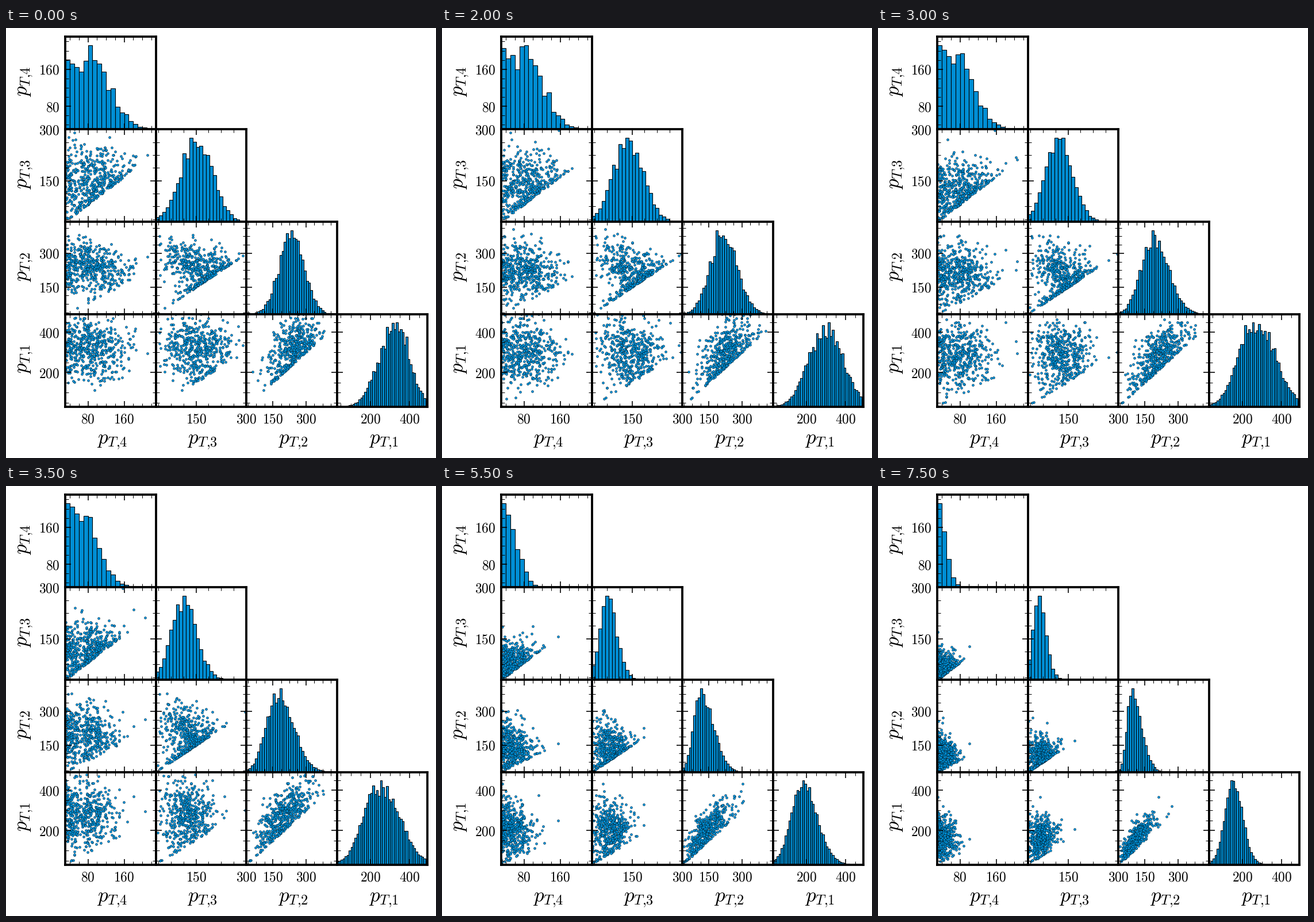
These frames come from a looping animation (748x748 px, 8 s). A matplotlib script:

```python
import numpy as np
import matplotlib.pyplot as plt
from matplotlib.animation import FuncAnimation
from matplotlib.ticker import AutoMinorLocator, MultipleLocator

SIZE, DPI = 748, 100
PX = 72 / DPI  # points per pixel
LEFT, TOP, W, H = 103.2, 15.4, 157.45, 160.8
FRAMES, STEP = 16, 500
N = 500
LOW, BIN = 30, 10
BLUE = "#008fd5"

rng = np.random.default_rng(14)
plt.rcParams["mathtext.fontset"] = "cm"


class Momentum:
    """One variable; (start, end) pairs give its peak and half-widths."""

    def __init__(self, n, high, major, peak, left, right, swell):
        self.name = r"$p_{T{,}%d}$" % n
        self.high, self.major = high, major
        self.peak, self.left, self.right = peak, left, right
        self.swell = swell  # extra width halfway through
        self.edges = np.arange(LOW, high + 1, BIN)
        self.mid = self.edges[:-1] + BIN / 2
        self.grain = rng.normal(0, 1, len(self.mid))

    def bars(self, s):
        ease = (1 + np.cos(np.pi * s)) / 2
        bump = self.swell * np.sin(np.pi * s) ** 2
        peak, left, right = (b + (a - b) * ease
                             for a, b in (self.peak, self.left, self.right))
        z = self.mid - peak
        z /= np.where(z < 0, left + bump / 2, right + bump)
        tail = 0.035 * s * np.exp(-np.abs(z) / 1.5) * (z > 0)
        jitter = self.grain + rng.normal(0, 0.4, len(z))
        h = (np.exp(-z * z / 2) + tail) * np.exp((0.04 + 0.06 * ease) * jitter)
        return h / h.max()


VARS = (
    Momentum(4, 230, 80, (72, 30), (65, 40), (48, 17), 6),
    Momentum(3, 300, 150, (152, 59), (47, 14), (46, 23), 4),
    Momentum(2, 440, 150, (235, 87), (57, 20), (56, 45), 20),
    Momentum(1, 490, 200, (320, 150), (78, 42), (75, 49), 38),
)


def sample(heights, s):
    """Ordered quadruples whose marginals follow the four histograms."""
    # p2 pulls p1 along and, early on, pushes p3 the other way
    pts = rng.normal(size=(N, 4))
    pts[:, 3] += (0.4 + 1.4 * s) * pts[:, 2]
    pts[:, 1] -= 0.8 * (1 - s) * pts[:, 2]
    ranked = []
    for var, h in zip(VARS, heights):
        cdf = np.append(0, np.cumsum(h)) / h.sum()
        ranked.append(np.sort(np.interp(rng.random(N), cdf, var.edges)))
    for _ in range(15):
        for v in range(4):
            pts[np.argsort(pts[:, v]), v] = ranked[v]
        pts.sort(axis=1)
    return pts


def weight(pts, heights):
    w = np.ones(N)
    for x, h in zip(pts.T, heights):
        i = np.clip((x - LOW) // BIN, 0, len(h) - 1).astype(int)
        w *= h[i] / h.sum() + 1e-9
    return w


def build():
    """Each step keeps the points that still fit and redraws the others."""
    states = []
    for s in np.arange(FRAMES) / (FRAMES - 1):
        heights = [var.bars(s) for var in VARS]
        pts = sample(heights, s)
        if states:
            old, last = states[-1]
            ratio = np.sqrt(weight(last, heights) / weight(last, old))
            stay = rng.random(N) < 0.75 * np.minimum(1, ratio)
            pts = np.where(stay[:, None], last, pts)
        states.append((heights, pts))
    return states


STATES = build()

fig = plt.figure(figsize=(SIZE / DPI, SIZE / DPI), dpi=DPI, facecolor="white")


def panel(row, col):
    x, y = LEFT + col * W, SIZE - TOP - (row + 1) * H
    ax = fig.add_axes([x / SIZE, y / SIZE, W / SIZE, H / SIZE])
    ax.set(xlim=(LOW, VARS[col].high), ylim=(LOW, VARS[row].high))
    ax.set_axisbelow(False)
    for axis, var in ((ax.xaxis, VARS[col]), (ax.yaxis, VARS[row])):
        axis.set_major_locator(MultipleLocator(var.major))
        axis.set_minor_locator(AutoMinorLocator(4))
        axis.set_major_formatter(lambda n, _: f"${n:.0f}$")
    ax.tick_params(which="both", direction="in", top=True, right=row != col,
                   labelbottom=row == 3, labelleft=col == 0,
                   labelsize=23.5 * PX)
    ax.tick_params(which="major", length=10 * PX, width=1.6 * PX)
    ax.tick_params(which="minor", length=6 * PX, width=1 * PX)
    ax.tick_params(axis="x", pad=11 * PX)
    ax.tick_params(axis="y", pad=10 * PX)
    for spine in ax.spines.values():
        spine.set(linewidth=3.8 * PX, zorder=5)
    return ax


hists, dots = [], {}
for r in range(4):
    for c in range(r + 1):
        ax = panel(r, c)
        if r == c:
            hists.append(ax.bar(VARS[c].mid, 0, BIN, LOW, color=BLUE,
                                edgecolor="black", linewidth=1.1 * PX))
        else:
            dots[r, c], = ax.plot([], [], "o", color=BLUE, ms=4.1 * PX,
                                  mec="black", mew=0.35 * PX, zorder=1)

style = dict(fontsize=35 * PX, ha="center", va="baseline",
             rotation_mode="anchor")
for v, var in enumerate(VARS):
    fig.text((LEFT + (v + 0.5) * W + 2.5) / SIZE, 1 - 723 / SIZE, var.name,
             **style)
    fig.text(37.5 / SIZE, 1 - (TOP + (v + 0.5) * H - 2) / SIZE, var.name,
             rotation=90, **style)


def update(k):
    heights, pts = STATES[k]
    for var, rects, hs in zip(VARS, hists, heights):
        for rect, h in zip(rects, hs):
            rect.set_height(h * (var.high - LOW) / 1.1)
    for (r, c), line in dots.items():
        line.set_data(pts[:, c], pts[:, r])
    return []


anim = FuncAnimation(fig, update, frames=FRAMES, interval=STEP, repeat=True,
                     repeat_delay=0, init_func=lambda: update(0))
plt.show()
```
